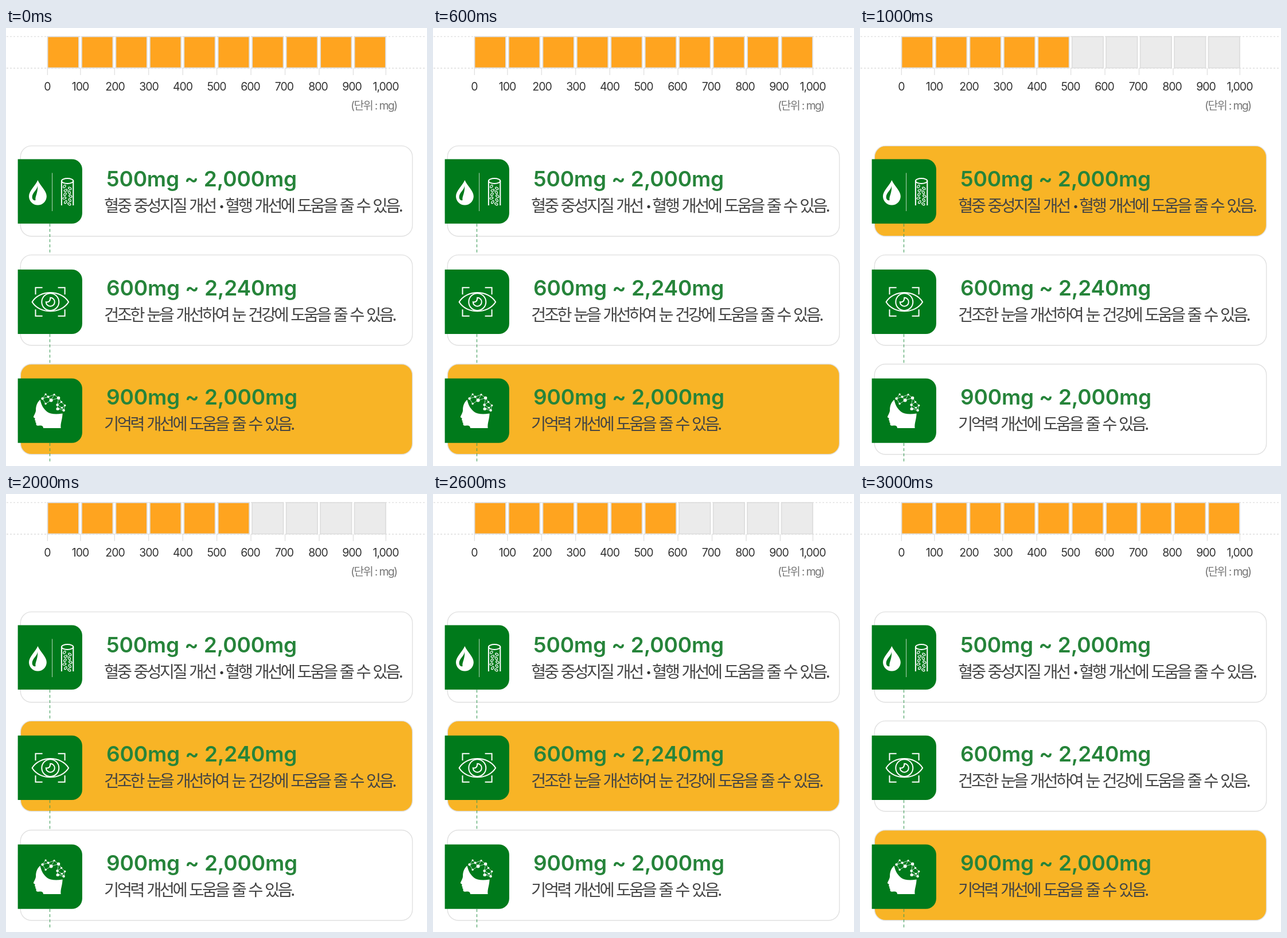
An HTML page that plays this animation: 734x763 px, repeating every 4000 ms.

```html
<!DOCTYPE html>
<html lang="ko">
<head>
<meta charset="utf-8">
<title>일일 섭취량</title>
<style>
  html, body { margin: 0; width: 100%; height: 100%; overflow: hidden; background: #fff; }
  svg { display: block; width: 100%; height: 100%; }
  text { font-family: Inter, "Noto Sans CJK KR", "Noto Sans CJK", sans-serif; }
  .tick { font-size: 19.5px; letter-spacing: -1px; fill: #333; text-anchor: middle; }
  .unit { font-size: 19.5px; letter-spacing: -1.7px; fill: #777; }
  .dose { font-size: 37px; font-weight: 600; letter-spacing: -.2px; fill: #26843a; }
  .note { font-family: "Noto Sans CJK KR", "Noto Sans CJK", sans-serif; font-size: 28.5px;
    font-weight: 300; letter-spacing: -3.55px; word-spacing: 1.7px; fill: #444; }
  .dot { font-size: 17px; text-anchor: middle; fill: #333; }
  .line { fill: none; stroke: #fff; stroke-width: 2; }
  .solid { fill: #fff; }
</style>
</head>
<body>
<svg id="stage" viewBox="0 0 734 763" xmlns="http://www.w3.org/2000/svg"></svg>
<script>
const GREEN = '#007a1b', GREY = '#ebebeb', ORANGE = '#ffa41f', AMBER = '#f8b426';
const STEP = 59.45;
const stage = document.getElementById('stage');

function add(tag, attrs, parent = stage, content = '') {
  const el = document.createElementNS('http://www.w3.org/2000/svg', tag);
  for (const key in attrs) el.setAttribute(key, attrs[key]);
  el.textContent = content;
  return parent.appendChild(el);
}
const path = (d, cls, parent) => add('path', { d, class: cls }, parent);
const label = (text, x, y, cls) => add('text', { x, y, class: cls }, stage, text);

// Scale
for (const y of [14.8, 70]) {
  add('path', { d: `M1 ${y}H732`, stroke: '#dedede', 'stroke-width': 1.3, 'stroke-dasharray': '3 3' });
}
const cells = [];
for (let i = 0; i <= 10; i++) {
  const tickX = i === 0 ? 72.3 : i === 10 ? 662.3 : 70.4 + STEP * i;
  add('path', { d: `M${tickX} 70V82`, stroke: '#dedede', 'stroke-width': 1.2 });
  if (i < 10) {
    cells.push(add('rect', {
      x: 72.5 + STEP * i, y: 15, width: 54.4, height: 54.5,
      stroke: '#dedede', 'stroke-width': 1.8
    }));
  }
  label((i * 100).toLocaleString('en-US'), i === 1 ? 129.6 : 72 + 59 * i, 109, 'tick');
}
label('(단위 : mg)', 601, 142, 'unit');

// Icons, drawn relative to the top left corner of their tile
function vessels(g) {
  path('M34.8 36.5C31 46 19.4 55 19.4 64.5A15.4 15.4 0 0 0 50.2 64.5C50.2 55 38.6 46 34.8 36.5Z', 'solid', g);
  add('path', { d: 'M34.5 46C34 54 25 58 25 66C25 70.5 28.5 72.5 31 71.5C29.5 65 35.5 59 34.5 46Z', fill: GREEN }, g);
  add('path', { d: 'M60 24V90.5', stroke: '#b6d8bd', 'stroke-width': 1 }, g);
  path('M76.3 38V80.5M96.7 38V80.5', 'line', g);
  add('ellipse', { cx: 86.5, cy: 38, rx: 10.2, ry: 4.4, class: 'line' }, g);
  for (let i = 0; i < 10; i++) {
    const x = 82.3 + (i % 2) * 8.4 + (i % 3 - 1), y = 47.5 + i * 3.4;
    add('ellipse', {
      cx: x, cy: y, rx: 2.9, ry: 1.7, style: 'stroke-width:1.2', class: 'line',
      transform: `rotate(${[-55, 35, -20, 60][i % 4]} ${x} ${y})`
    }, g);
  }
}

function eye(g) {
  path('M30.9 43.5V31.5H43M70 31.5H82V43.5M82 69.5V81H70M43 81H30.9V69.5', 'line', g);
  path('M25 56.5C38 35 75.5 35 88.5 56.5C75.5 78 38 78 25 56.5Z', 'line', g);
  add('circle', { cx: 56.7, cy: 56.5, r: 15, class: 'line' }, g);
  path('M56.7 49A7.5 7.5 0 1 1 49.2 56.5Q56.7 58 56.7 49Z', 'line', g);
}

function head(g) {
  path('M39 37C34 41 31.5 48 31.5 54C32 59 28 64 27.3 67C27.3 68.5 30 68.5 30 70' +
    'L29.5 72.5L31 74L30.5 76L32 77.5C31.5 81.5 33 82.5 36 82.3' +
    'C41 81.5 44 82 44.5 86.5H75C74 78 77.5 73 78 61' +
    'C66 63 56 62 51 58C45 53 41 47 39 37Z', 'solid', g);
  const nodes = [[43, 35, 2.2], [48.5, 27.5, 1.6], [53, 32, 2], [58, 38, 3], [48.5, 44, 1.7],
    [63.5, 28, 1.6], [71, 34, 2.7], [76, 41, 1.7], [69, 46, 2.2], [82, 47, 1.8],
    [77, 51, 1.6], [69.5, 53, 2.6], [80, 55.5, 2.2]];
  const links = ['0 1 2 0', '2 3 4 0', '2 5 6 3', '5 3', '6 7 9 10 8 6', '7 8 11 12 9', '10 12', '10 11'];
  for (const link of links) {
    const points = link.split(' ').map(n => nodes[n].slice(0, 2).join(' '));
    add('path', { d: 'M' + points.join('L'), class: 'line', style: 'stroke-width:.7' }, g);
  }
  for (const [cx, cy, r] of nodes) add('circle', { cx, cy, r, class: 'solid' }, g);
}

// Cards
const rows = [
  { y: 205.4, tile: 228.5, dose: '500mg ~ 2,000mg', icon: vessels, tail: 418,
    notes: [['혈중 중성지질 개선', 171], ['혈행 개선에 도움을 줄 수 있음.', 382]] },
  { y: 395.4, tile: 420.7, dose: '600mg ~ 2,240mg', icon: eye, tail: 608,
    notes: [['건조한 눈을 개선하여 눈 건강에 도움을 줄 수 있음.', 171]] },
  { y: 585.5, tile: 610.5, dose: '900mg ~ 2,000mg', icon: head, tail: 759,
    notes: [['기억력 개선에 도움을 줄 수 있음.', 171]] }
];
const cards = rows.map(row => {
  const card = add('rect', {
    x: 25.3, y: row.y, width: 683.3, height: 157.3, rx: 19, stroke: '#e0e0e0', 'stroke-width': 1.4
  });
  add('path', {
    d: `M76.5 ${row.tile + 112.5}V${row.tail}`, stroke: '#3f9d5a', 'stroke-width': 1.1, 'stroke-dasharray': '5 4'
  });
  const g = add('g', { transform: `translate(20.6 ${row.tile})` });
  add('path', { d: 'M0 0H94.3A18 18 0 0 1 112.3 18V94.3A18 18 0 0 1 94.3 112.3H0Z', fill: GREEN }, g);
  row.icon(g);
  label(row.dose, 175, row.y + 70.8, 'dose');
  for (const [text, x] of row.notes) label(text, x, row.y + 114.5, 'note');
  return card;
});
label('•', 376, 316, 'dot');

const steps = [
  { card: 2, filled: 10 }, { card: 0, filled: 5 }, { card: 1, filled: 6 }, { card: 2, filled: 10 }
];

function draw(ms) {
  const step = steps[Math.floor(ms % 4000 / 1000)];
  cells.forEach((cell, i) => cell.setAttribute('fill', i < step.filled ? ORANGE : GREY));
  cards.forEach((card, i) => card.setAttribute('fill', i === step.card ? AMBER : '#fff'));
}

const start = performance.now();
function tick() {
  draw(performance.now() - start);
  requestAnimationFrame(tick);
}
tick();
</script>
</body>
</html>
```
